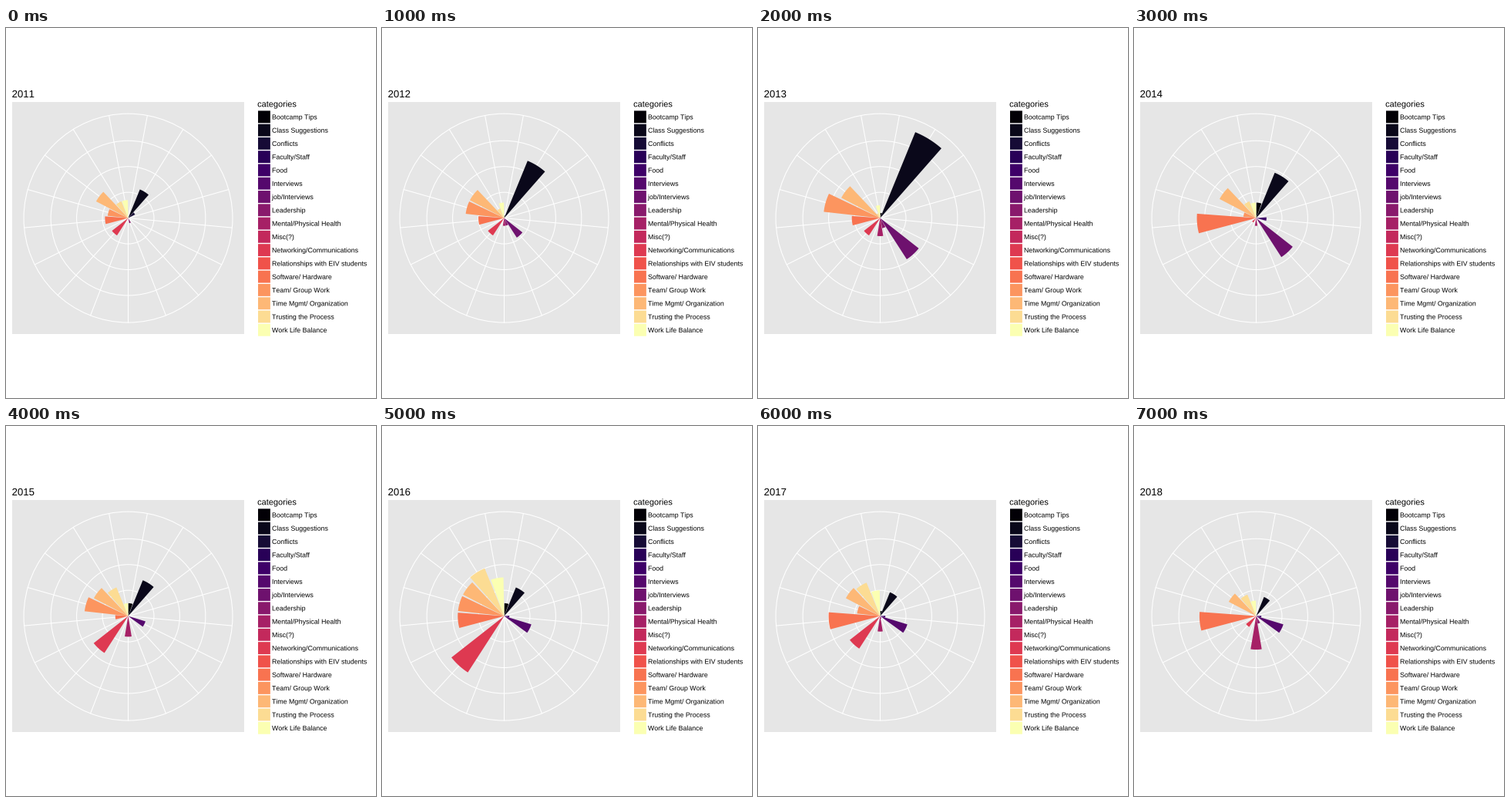
A matplotlib script for the animation above (8000 ms loop, 480 by 480 pixels).

```python
import numpy as np
import matplotlib.pyplot as plt
from matplotlib.animation import FuncAnimation
from matplotlib.patches import Circle, PathPatch, Polygon, Rectangle
from matplotlib.textpath import TextPath
from matplotlib.transforms import Affine2D

plt.rcParams["font.family"] = "Liberation Sans"
plt.rcParams["text.kerning_factor"] = 6    # plain advance widths

SIZE, DPI = 480, 80
START, YEARS = 2011, 8
CX, CY = 158.5, 246.6              # centre of the polar chart
PANEL = 301
UNIT = 0.4 * PANEL / 36            # pixels per counted item
RIM = 0.45 * PANEL
KEY = 17.28                        # legend row height

# Each category's turning points: years since the start -> count
TRENDS = {
    "Bootcamp Tips": {0: 0, 2: 2, 3: 6, 4: 5, 5: 5, 7: 0},
    "Class Suggestions": {0: 12, 2: 36, 3: 19, 5: 12, 7: 8},
    "Conflicts": {0: 3, 1: 0},
    "Faculty/Staff": {0: 0},
    "Food": {2: 0, 3: 4, 4: 0, 5: 2},
    "Interviews": {3: 0, 4: 7, 5: 11},
    "job/Interviews": {0: 0, 2: 19, 3: 18, 4: 0},
    "Leadership": {0: 2, 2: 4, 3: 0, 5: 0, 7: 3},
    "Mental/Physical Health": {0: 0, 2: 7, 3: 3, 4: 8, 5: 0, 7: 13},
    "Misc(?)": {0: 0},
    "Networking/Communications": {2: 8, 3: 2, 4: 17, 5: 26, 7: 5},
    "Relationships with EIV students": {0: 0},
    "Software/ Hardware": {0: 9, 2: 11, 3: 23, 4: 5, 5: 18, 7: 22},
    "Team/ Group Work": {0: 8, 2: 22, 3: 5, 4: 17, 5: 18, 7: 0},
    "Time Mgmt/ Organization": {0: 14, 2: 17, 4: 15, 5: 18, 7: 12},
    "Trusting the Process": {0: 7, 2: 2, 4: 12, 5: 20, 7: 9},
    "Work Life Balance": {0: 7, 2: 5, 3: 6, 4: 5, 5: 15, 7: 6},
}
N = len(TRENDS)


def count_at(trend, step):
    """Whole count on the straight line between turning points."""
    return int(np.interp(step, list(trend), list(trend.values())))


def to_xyz(*primaries):
    """Linear RGB to XYZ matrix for the given chromaticities, white D65."""
    m = np.array([(x / y, 1, (1 - x - y) / y) for x, y in primaries]).T
    return m * np.linalg.solve(m, [0.9505, 1, 1.089])


def display(rgb):
    """Convert sRGB to a gamma 1.8 display space."""
    rgb = np.asarray(rgb)
    linear = np.where(rgb <= 0.04045, rgb / 12.92,
                      ((rgb + 0.055) / 1.055) ** 2.4)
    srgb = to_xyz((0.64, 0.33), (0.30, 0.60), (0.15, 0.06))
    screen = to_xyz((0.63, 0.341), (0.295, 0.605), (0.155, 0.077))
    linear = linear @ np.linalg.solve(screen, srgb).T
    return np.clip(linear, 0, 1) ** (1 / 1.8)


def polar(radius, turn):
    """Point at a clockwise fraction of a turn from twelve o'clock."""
    a = 2 * np.pi * np.asarray(turn)
    return CX + radius * np.sin(a), CY - radius * np.cos(a)


def bar_points(i, count):
    turns = (i + 0.5 + np.linspace(-0.45, 0.45, 24)) / N
    x, y = polar(count * UNIT, turns)
    return np.column_stack([np.append(x, CX), np.append(y, CY)])


def text_path(x, y, text, size):
    flip = Affine2D().scale(1, -1).translate(x, y)
    return flip.transform_path(TextPath((0, 0), text, size=size))


def write(*args):
    return ax.add_patch(PathPatch(text_path(*args), fc="black", lw=0,
                                  snap=False))


def title_path(step):
    return text_path(7.6, 90, str(START + step), 13.2)


fig = plt.figure(figsize=(SIZE / DPI, SIZE / DPI), dpi=DPI, facecolor="white")
ax = fig.add_axes([0, 0, 1, 1])
ax.set(xlim=(0, SIZE), ylim=(SIZE, 0))
ax.axis("off")

ax.add_patch(Rectangle((8, 96), PANEL, PANEL, fc="#e6e6e6", lw=0))

grid = dict(color="white", lw=1.07 * 72 / DPI, zorder=2, snap=False)
for i in range(N):
    x, y = polar(RIM, (i + 0.5) / N)
    ax.plot([CX, x], [CY, y], **grid)
for radius in (10 * UNIT, 20 * UNIT, 30 * UNIT, RIM):
    ax.add_patch(Circle((CX, CY), radius, fill=False, **grid))

colors = display(plt.get_cmap("magma")(np.linspace(0, 1, N))[:, :3])
write(326.1, 102.3, "categories", 11)
for i, (label, color) in enumerate(zip(TRENDS, colors)):
    mid = 115.3 + i * KEY
    ax.add_patch(Rectangle((327, mid - 7.93), 15.86, 15.86, fc=color, lw=0,
                           snap=False))
    write(345, mid + 3.15, label, 8.8)

title = ax.add_patch(PathPatch(title_path(0), fc="black", lw=0, snap=False))
bars = [ax.add_patch(Polygon(bar_points(i, 0), fc=c, lw=0, zorder=3))
        for i, c in enumerate(colors)]


def update(step):
    title.set_path(title_path(step))
    for i, (bar, trend) in enumerate(zip(bars, TRENDS.values())):
        count = count_at(trend, step)
        bar.set_xy(bar_points(i, count))
        bar.set_visible(count > 0)
    return [title, *bars]


anim = FuncAnimation(fig, update, frames=YEARS, interval=1000,
                     repeat=True, repeat_delay=0, blit=False)
plt.show()
```
